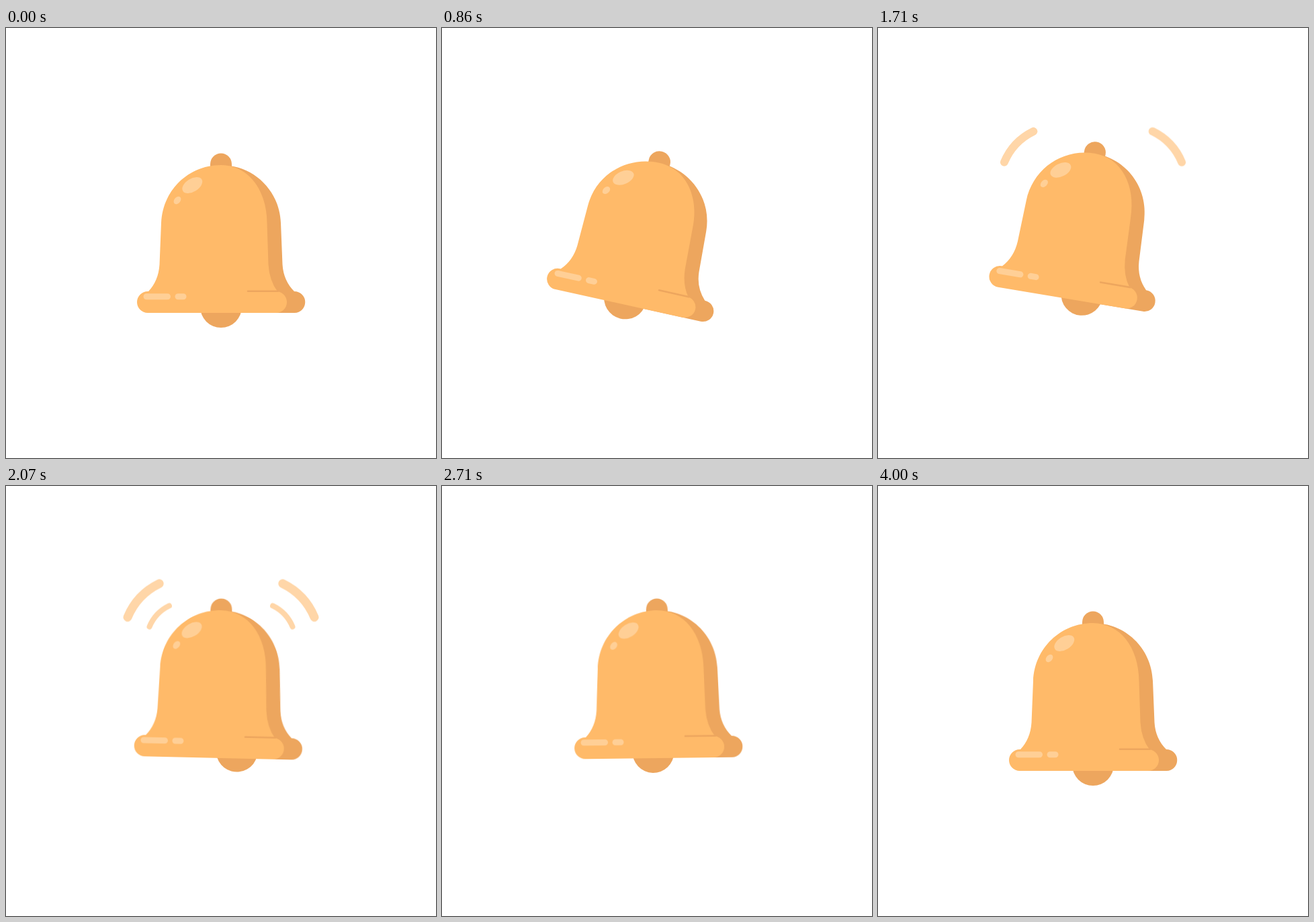
These frames come from a looping animation (640x640 px, 4.21 s). An HTML page:

```html
<!DOCTYPE html>
<html lang="en">
<head>
<meta charset="utf-8">
<title>Ringing bell</title>
<style>
  html, body { margin: 0; height: 100%; overflow: hidden; background: #fff; }
  svg { display: block; width: 100vw; height: 100vh; }
  .light { fill: #ffba69; }
  .dark { fill: #eda65e; }
  .shine { fill: #ffcf96; }
  .wave { fill: none; stroke: #ffd6a8; stroke-width: 14; stroke-linecap: round; }
</style>
</head>
<body>
<svg viewBox="0 0 640 640">
  <defs>
    <path id="arc" class="wave" d="M41.8 -94.3A105 105 0 0 1 92.8 -40.3"/>
  </defs>
  <g id="waves"></g>
  <g id="bell">
    <circle id="clapper" class="dark" cx="320" cy="415" r="31"/>
    <path class="dark" d="M304 212V202.5a16 16 0 0 1 32 0V212z"/>
    <path class="dark" d="M320 204C368 204 407 241 409 290L411.5 352Q413 376 429 392
      A16 16 0 0 1 429.5 424H320z"/>
    <path class="light" d="M320 204C272 204 233 241 231 290L228.5 352Q227 376 212 392
      H211A16 16 0 0 0 211 424H402A16 16 0 0 0 402 392H404Q392 376 390.5 352
      L388.5 290C388 240 360 204 320 204z"/>
    <path class="dark" d="M360 390.4H404L406 393H360a1.3 1.3 0 0 1 0-2.6z"/>
    <g id="gloss" class="shine">
      <ellipse cx="277.3" cy="234" rx="16.5" ry="9.7" transform="rotate(-32 277.3 234)"/>
      <ellipse cx="255" cy="256.5" rx="6.5" ry="4.6" transform="rotate(-52 255 256.5)"/>
    </g>
    <rect class="shine" x="204.5" y="395.3" width="40.5" height="9" rx="4.5"/>
    <rect class="shine" x="251.5" y="395.3" width="17" height="9" rx="4.5"/>
  </g>
</svg>
<script>
const LOOP = 4210, FPS = 14, PIVOT_Y = 220;
const RING_START = 1124, RING_LENGTH = 2130, PERIOD = 415, AMPLITUDE = 20.6;
const WAVE_COUNT = 5, FIRST_WAVE = 845, WAVE_GAP = 290;

// Key points are [time in ms, value], with easing between neighbours.
const swingWindUp = [[650, 0], [985, 18.2], [RING_START, -AMPLITUDE]];
const clapperWindUp = [[570, 0], [860, 1.8], [RING_START, 0]];
const lift = [[560, 0], [715, 23], [975, -24], [1240, -15], [2070, -19],
  [2850, -19], [3090, 17], [3350, 0]];

const clamp = x => Math.min(1, Math.max(0, x));
const wave = t => Math.cos(2 * Math.PI * t / PERIOD);
const bump = (t, centre, reach) =>
  Math.cos(Math.PI / 2 * clamp(Math.abs(t - centre) / reach)) ** 2;

function sample(keys, t) {
  let value = keys[0][1];
  for (let i = 1; i < keys.length; i++) {
    const [t0, v0] = keys[i - 1], [t1, v1] = keys[i];
    value += (v1 - v0) * (1 - Math.cos(Math.PI * clamp((t - t0) / (t1 - t0)))) / 2;
  }
  return value;
}

function bellAngle(t) {
  if (t < RING_START) return sample(swingWindUp, t);
  const age = t - RING_START;
  return -AMPLITUDE * clamp(1 - age / RING_LENGTH) ** 2 * wave(age);
}

// The clapper swings inside the bell, building up and dying away.
function clapperAngle(t) {
  if (t < RING_START) return sample(clapperWindUp, t);
  return -8.9 * Math.exp(-(((t - 1880) / 740) ** 2)) * wave(t - 2064);
}

const byId = id => document.getElementById(id);
const bell = byId('bell'), clapper = byId('clapper');
const gloss = byId('gloss'), waves = byId('waves');

waves.innerHTML = '<g><use href="#arc"/><use href="#arc"/></g>'.repeat(WAVE_COUNT);

function drawWave(group, i, t) {
  const age = t - FIRST_WAVE - i * WAVE_GAP;
  const opacity = clamp((age - 15) / 40) * clamp((500 - age) / 120);
  const size = 0.485 + 0.0014 * age - 4.5e-7 * age * age;
  group.setAttribute('opacity', opacity);
  [1, -1].forEach((side, k) => group.children[k].setAttribute('transform',
    `translate(${53 * side} 0) scale(${size * side} ${size})`));
}

function draw(t) {
  const y = sample(lift, t), angle = bellAngle(t);
  const squash = 0.024 * (bump(t, 740, 240) + bump(t, 3090, 250));
  bell.setAttribute('transform',
    `translate(320 ${PIVOT_Y + y}) rotate(${angle}) ` +
    `scale(${1 + squash} ${1 - squash}) translate(-320 ${-PIVOT_Y})`);
  clapper.setAttribute('transform', `rotate(${clapperAngle(t)} 320 ${PIVOT_Y})`);
  // The gloss slides back around the dome as the bell tilts.
  gloss.setAttribute('transform', `rotate(${-0.36 * angle} 320 290)`);
  waves.setAttribute('transform', `translate(320 ${251.6 + y})`);
  [...waves.children].forEach((group, i) => drawWave(group, i, t));
}

const start = performance.now();
function tick() {
  const t = (performance.now() - start) % LOOP;
  // The motion is stepped at a fixed rate.
  draw(Math.floor((t + 5) * FPS / 1000) * 1000 / FPS);
  requestAnimationFrame(tick);
}
tick();
</script>
</body>
</html>
```
